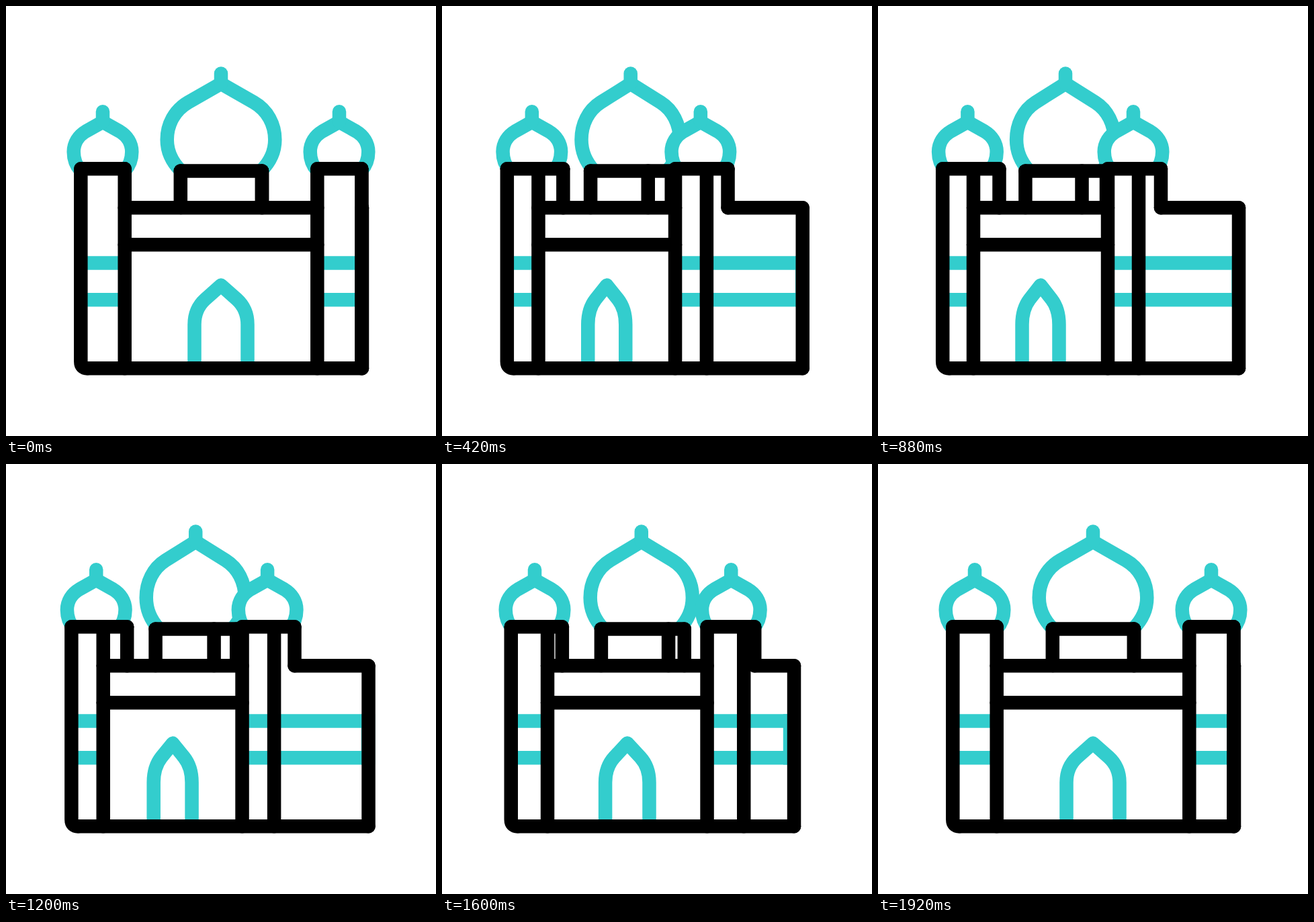
Animation of 640x640 px, one loop 2400 ms. Source, as an HTML page without scripts:

```html
<!DOCTYPE html>
<html lang="en">
<head>
<meta charset="utf-8">
<title>Turning palace</title>
<style>
@property --p { syntax: "<number>"; inherits: true; initial-value: 0; }
@property --w { syntax: "<number>"; inherits: true; initial-value: 530; }
@property --d { syntax: "<number>"; inherits: true; initial-value: 0; }

html, body { margin: 0; width: 100%; height: 100%; overflow: hidden; background: #fff; }

/* --p: turn amount, --w: far wall, --d: side narrowing on the way back */
@keyframes turn {
  0% { --p: 0; --w: 530; --d: 0; animation-timing-function: cubic-bezier(.333, 0, .667, 1); }
  20% { --p: 1; --w: 537; --d: 0; }
  38.33% { --p: 1; --w: 537; --d: 0; animation-timing-function: cubic-bezier(.333, 0, .667, .333); }
  50% { --p: .922; --w: 539.5; --d: 0; animation-timing-function: cubic-bezier(.333, .26, .667, .59); }
  60% { --p: .75; --w: 549; --d: 0; animation-timing-function: cubic-bezier(.333, .28, .667, .61); }
  66.67% { --p: .568; --w: 524; --d: 1; animation-timing-function: cubic-bezier(.333, .26, .667, .8); }
  80%, 100% { --p: 0; --w: 530; --d: 0; }
}

svg {
  display: block;
  width: 100%;
  height: 100%;
  animation: turn 2.4s linear infinite;
  /* left tower: edge, inner edge, back */
  --l: calc(111.3 - 15.1 * var(--p));
  --li: calc(176.7 - 34.7 * var(--p));
  --lb: calc(176.7 + 3.8 * var(--p));
  /* right tower */
  --r: calc(463.3 - 121.3 * var(--p));
  --ri: calc(529.3 - 141.3 * var(--p));
  --rb: calc(529.3 - 108.3 * var(--p) - 2.7 * var(--d));
  /* drum under the main dome */
  --dl: calc(259.8 - 40.4 * var(--p));
  --dr: calc(381 - 77.5 * var(--p));
  --db: calc(381 - 41 * var(--p) + 3 * var(--d));
  /* end of the side bands */
  --e: calc(var(--w) - .5 - 5.5 * var(--d));
}

path { fill: none; stroke-width: 20.5; stroke-linejoin: round; vector-effect: non-scaling-stroke; }
.ink { stroke: #000; stroke-linecap: round; }
.teal { stroke: #33cdcd; }
.tip { stroke-linecap: round; }
.small path { fill: #fff; }

.v { transform: translateX(calc(var(--x) * 1px)); }
.h {
  transform: translate(calc(var(--a) * 1px), calc(var(--y) * 1px)) scaleX(calc(var(--b) - var(--a)));
}
.face {
  fill: #fff;
  x: calc(var(--a) * 1px);
  width: calc((var(--b) - var(--a)) * 1px);
}
.main { transform: translateX(calc(320px - 41px * var(--p))) scaleX(calc(1 - .092 * var(--p))); }
.door { transform: translateX(calc(320px - 78px * var(--p))) scaleX(calc(1 - .304 * var(--p))); }
</style>
</head>
<body>
<svg viewBox="0 0 640 640">
  <defs>
    <g id="small" class="small">
      <path d="M-33 245C-40 237-43.3 227-43.3 217C-43.3 204-36 193-25 186.5L0 172.5L25 186.5C36 193 43.3 204 43.3 217C43.3 227 40 237 33 245"/>
      <path class="tip" d="M0 157.3V172"/>
    </g>
    <path id="bar" d="M0 0H1"/>
    <path id="post" d="M0 242.3V539.3"/>
    <path id="stub" d="M0 242.3V300.3"/>
  </defs>

  <!-- domes -->
  <g class="teal">
    <g class="main">
      <path d="M-60 245C-74 231-80.3 216-80.3 199C-80.3 176-69 155-49 143.5L0 115.5L49 143.5C69 155 80.3 176 80.3 199C80.3 216 74 231 60 245"/>
      <path class="tip" d="M0 100.5V115"/>
    </g>
    <use href="#small" class="v" style="--x:calc(144 - 10.6*var(--p))"/>
    <use href="#small" class="v" style="--x:calc(496 - 116*var(--p))"/>
  </g>

  <!-- drum and tower backs -->
  <g class="ink">
    <use href="#bar" class="h" style="--a:var(--dl);--b:var(--db);--y:245.6"/>
    <path class="v" style="--x:var(--dl)" d="M0 245.6V300"/>
    <path class="v" style="--x:var(--dr)" d="M0 245.6V300"/>
    <path class="v" style="--x:var(--db)" d="M0 245.6V300"/>
    <use href="#stub" class="v" style="--x:var(--lb)"/>
    <use href="#stub" class="v" style="--x:var(--rb)"/>
  </g>

  <rect class="face" style="--a:var(--l);--b:var(--li)" y="242.3" height="297"/>
  <rect class="face" style="--a:var(--r);--b:var(--ri)" y="242.3" height="297"/>

  <!-- bands and door -->
  <g class="teal">
    <use href="#bar" class="h" style="--a:var(--l);--b:var(--li);--y:382.4"/>
    <use href="#bar" class="h" style="--a:var(--l);--b:var(--li);--y:437.2"/>
    <use href="#bar" class="h" style="--a:var(--r);--b:var(--e);--y:382.4"/>
    <use href="#bar" class="h" style="--a:var(--r);--b:var(--e);--y:437.2"/>
    <path class="v" style="--x:var(--e)" d="M0 372.2V447.4"/>
    <path class="door" d="M-39.5 539V474C-39.5 459-34 446-23.5 436.5L0 415.6L23.5 436.5C34 446 39.5 459 39.5 474V539"/>
  </g>

  <!-- walls -->
  <g class="ink">
    <path class="v" style="--x:var(--l)" d="M0 242.3V529.3Q0 539.3 10 539.3"/>
    <use href="#post" class="v" style="--x:var(--li)"/>
    <use href="#post" class="v" style="--x:var(--r)"/>
    <use href="#post" class="v" style="--x:var(--ri)"/>
    <path class="v" style="--x:var(--w)" d="M0 300.3V539.3"/>
    <use href="#bar" class="h" style="--a:var(--l);--b:var(--lb);--y:242.3"/>
    <use href="#bar" class="h" style="--a:var(--r);--b:var(--rb);--y:242.3"/>
    <use href="#bar" class="h" style="--a:var(--li);--b:var(--r);--y:300.3"/>
    <use href="#bar" class="h" style="--a:var(--li);--b:var(--r);--y:355.2"/>
    <use href="#bar" class="h" style="--a:var(--rb);--b:var(--w);--y:300.3"/>
    <use href="#bar" class="h" style="--a:calc(var(--l) + 10);--b:var(--w);--y:539.3"/>
  </g>
</svg>
</body>
</html>
```
